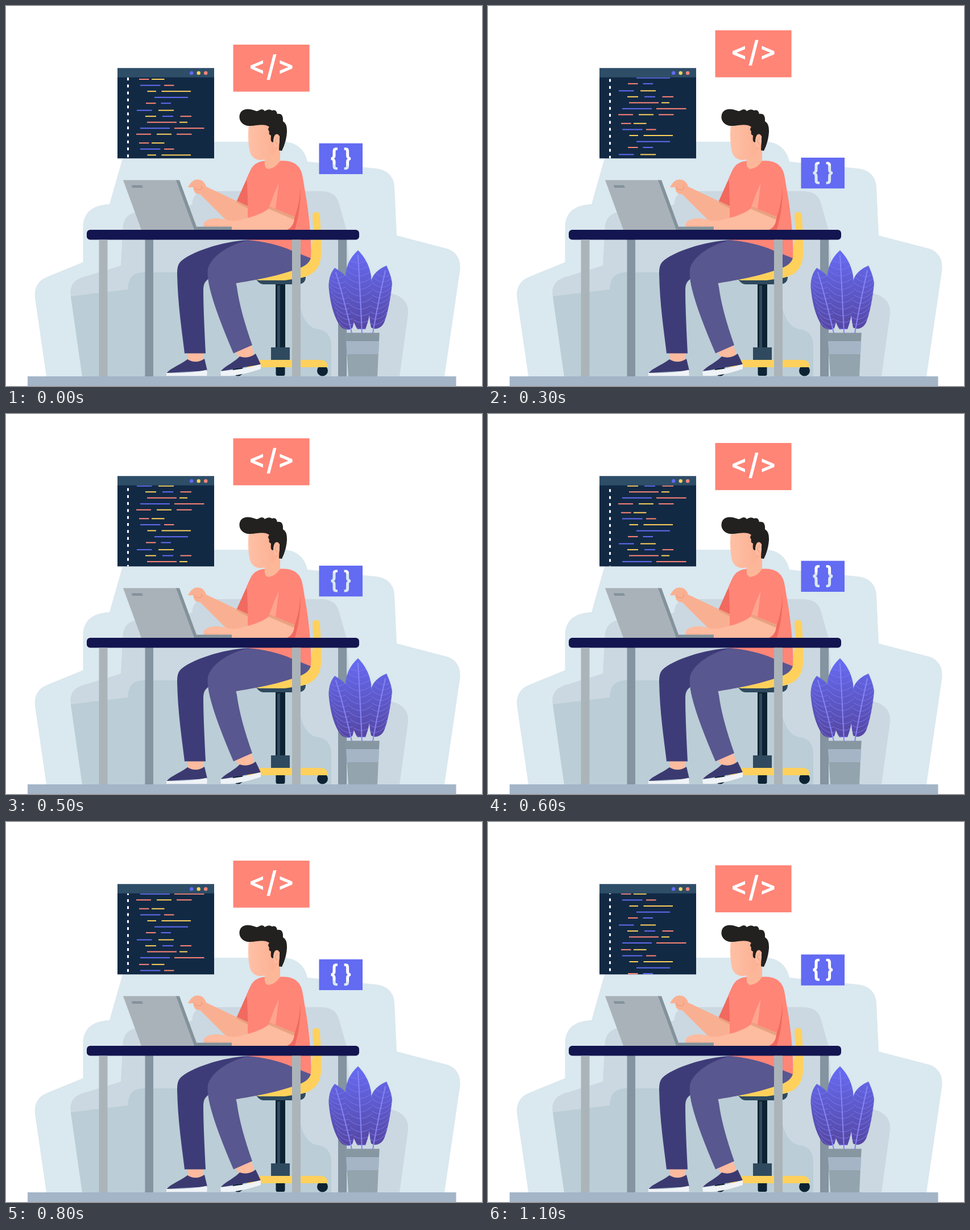
Animation of 837x669 px, one loop 1.2 s. Source, as an HTML page with a canvas:

```html
<!DOCTYPE html>
<html lang="en">
<head>
<meta charset="utf-8">
<title>Coding at a desk</title>
<style>
html, body { margin: 0; width: 100%; height: 100%; overflow: hidden; background: #fff; }
canvas { display: block; }
</style>
</head>
<body>
<canvas id="stage" width="837" height="669"></canvas>
<script>
const W = 837, H = 669, STEP = 100, STEPS = 12;
const RED = '#ff8577', YELLOW = '#ffd15c', BLUE = '#626bf2';
const SLATE = '#2f4a5f', DARK = '#0d2232', SKIN = '#fdbb9f', FAR_SKIN = '#f9b092';
const FOLD = '#f2695f', STEEL = '#a9b2b8', SHADE = '#8494a0';

const stage = document.getElementById('stage').getContext('2d');
const backdrop = layer(), front = layer();

function layer() {
  const c = document.createElement('canvas');
  c.width = W;
  c.height = H;
  return c.getContext('2d');
}

function fill(c, d, color) {
  c.fillStyle = color;
  c.fill(new Path2D(d));
}

function line(c, d, color, width) {
  c.strokeStyle = color;
  c.lineWidth = width;
  c.lineCap = 'round';
  c.stroke(new Path2D(d));
}

// Rectangle given by its left, top, right and bottom edges.
function box(c, x1, y1, x2, y2, color) {
  c.fillStyle = color;
  c.fillRect(x1, y1, x2 - x1, y2 - y1);
}

function dot(c, x, y, r, color) {
  c.fillStyle = color;
  c.beginPath();
  c.arc(x, y, r, 0, Math.PI * 2);
  c.fill();
}

function fade(c, x1, y1, x2, y2, from, to) {
  const g = c.createLinearGradient(x1, y1, x2, y2);
  g.addColorStop(0, from);
  g.addColorStop(1, to);
  return g;
}

function drawSofa(c) {
  fill(c, `M71 652 L51 514 Q48 487 72 477 L135.500 451 V389 C136 362 154 350 182 349 L205 268 L211 250
    Q215 239 230 239 H488 C510 239 526 253 530 274 L650 286 C671 288 682 301 683 318 L687 404
    L775 427 C792 432 800 446 798.500 464 L771 652 Z`, '#dae8ef');
  fill(c, `M134 652 L114 512 C111 491 120 481 140 476 L202 457 L205.500 390 C207 371 219 363 236 362
    L327 350 Q329 326 350 326 H553 C570 326 581 332 585 346 L599 395 L606 488 L672 505
    C695 508 709 522 707 542 L692 652 Z`, '#cbd8e1');
  fill(c, `M134 652 L114 511 L214 499 C215 480 222 470 240 469 H480 Q500 469 505 490 L518 533
    Q527 566 548 569 C565 571 572 583 572 598 V652 Z`, '#bbcdd6');
}

function drawChair(c) {
  dot(c, 408, 642, 9.5, DARK);
  dot(c, 556.5, 642, 9.5, DARK);
  fill(c, 'M474.500 634 H490.500 V648 Q490.500 651 487.500 651 H477.500 Q474.500 651 474.500 648 Z', DARK);
  fill(c, 'M425 623 H555 Q565 624 566 636 H425 Z', YELLOW);
  box(c, 474, 488, 491, 602, DARK);
  box(c, 477, 492, 482, 602, SLATE);
  box(c, 466, 601, 499, 623, SLATE);
  fill(c, 'M438 477 H527 C527 485 522 490 513 490 H452 Q443 489 438 477 Z', SLATE);
  fill(c, `M430 478 L534 446 L541 400 L539 369 a6.500 6.500 0 0 1 13 0 L554 410 V438
    C553 462 540 475 517 479 L490 483 H447 Q440 483 437 478 Z`, YELLOW);
}

function drawLegs(c) {
  fill(c, 'M319 610 H347 L345 626 Q330 632 321 624 Z', SKIN);
  fill(c, 'M403 608 L431 596 L437 615 Q424 625 412 621 Z', SKIN);
  fill(c, 'M283 646 C287 639 304 633 319 622 Q334 631 349 621 L354 642 Z', '#3b3a70');
  fill(c, 'M282 646 Q320 648 353.500 640.500 V651 H282 Z', '#f0f3f7');
  fill(c, 'M378 643 C382 636 400 628 411 617 Q426 622 439 612 L448 631 Z', '#3b3a70');
  fill(c, 'M377 643 Q415 641 448 630.500 V639 C430 645 411 650 394 651 H378 Z', '#f0f3f7');
  fill(c, `M427 412 C380 414 325 433 307 450 C302 455 301 462 301 472 C302 525 309 570 314 611.500
    H351 C349 570 347 530 347 500 C347 490 350 484 357 480 L430 455 Z`, '#3e3c78');
  fill(c, `M427 412 C390 420 360 442 355 463 C352 487 366 531 400 611.500 L433 597
    C420 560 410 525 406 495 L404.500 488 C430 484 470 477 500 467 C520 461 532 456 536 444 L510 412 Z`, '#58578f');
}

function drawBody(c) {
  // far arm
  fill(c, `M320 319 C326 309 330 305 338 305.500 C346 306 350 312 352 318 L407 344 L426 353 V380
    H390 L341 331 C334 332 330 328 329 319 L322 319.500 Z`, FAR_SKIN);
  line(c, 'M331 320 Q335 325 343 323 Q347 319 343 317', '#ef8f74', 1);
  fill(c, 'M406 342 L426 352 V357 L405.500 346 Z', '#e99e7e');
  fill(c, 'M430 289 L406 343 L426 352.500 L430 300 Z', FOLD);

  // torso
  fill(c, `M456 272.500 C440 274 433 281 429 291 L423 304 C426 330 425 370 425 412 C450 414 480 420 503 431
    L536 444 C538 420 533 370 529 345 L522 303 C520 285 510 273 489 272.500 Z`, RED);
  fill(c, 'M479.500 312 Q470 332 463 353 L474 357 Q477 334 479.500 312 Z', '#ffa48f');
  fill(c, 'M518 318 Q516 350 507 374 L496 394 H508 Q519 356 518 318 Z', FOLD);

  // near arm
  fill(c, `M463 356 L507 374 C506 387 499 394 488 395 H360 Q348 393 347 385 C349 377 360 373 374 374
    C385 375 395 380 405 378 C426 373 446 369 463 356 Z`, SKIN);
  fill(c, 'M463 353 L508 371 L506 376 L461.500 357 Z', '#e9a382');
  line(c, 'M349 387 H372', '#f4a589', .8);
}

function drawHead(c) {
  fill(c, 'M455 262 V279 Q456 287 462 287 Q474 285 482 273 V240 H455 Z', '#fcb798');
  fill(c, `M427 209 C425 225 426 245 429 257 C432 267 440 272 450 271 C463 270 472 261 475 251
    H480 V205 H427 Z`, fade(c, 426, 0, 474, 0, '#ffc0a6', '#fbb193'));
  fill(c, `M411 191 C413 184 420 180 430 182 C440 184 440 187 446 183 Q452 180 455 185 Q462 180 468 184
    Q475 181 477 190 Q488 188 487 203 C494 207 494 215 494 222 C493 236 489 247 485 255 L480 254
    L481 230 Q479 224 474 226 Q470 229 470 240 L467 239 C465 236 466 231 466 228 Q461 226 463 221
    Q459 217 463 213 C455 206 440 211 430 211 C418 212 408 203 411 191 Z`, '#22211f');
  c.fillStyle = SKIN;
  c.beginPath();
  c.ellipse(475.5, 238, 5.5, 11, .08, 0, Math.PI * 2);
  c.fill();
  line(c, 'M479 231 Q473 234 474 240 Q477 240 476 244', '#f39479', 1);
}

function drawDesk(c) {
  fill(c, 'M206 306.500 H301 L334 394 H238 Z', STEEL);
  fill(c, 'M299 306.500 H305 L335 388.500 H397 V394 H331 Z', '#83929b');
  fill(c, 'M220.500 315.500 H239 L241 320 H222.500 Z', '#83929b');
  c.fillStyle = '#12154f';
  c.beginPath();
  c.roundRect(142, 394, 479, 17.5, 6);
  c.fill();
  box(c, 163.5, 411.5, 178.5, 652, '#abb4b9');
  box(c, 503, 411.5, 518, 652, '#abb4b9');
}

function drawLeaf(c, outline, [x1, y1], [x2, y2], spread) {
  const shape = new Path2D(outline);
  c.fillStyle = fade(c, 0, 435, 0, 570, '#666bf2', '#5546a0');
  c.fill(shape);
  c.save();
  c.clip(shape);
  for (let u = .1; u < .95; u += .085) {
    const x = x1 + (x2 - x1) * u, y = y1 + (y2 - y1) * u;
    for (const side of [-spread, spread]) {
      line(c, `M${x} ${y} Q${x + side * .65} ${y - 2} ${x + side} ${y - 14}`, '#7f78ea', .9);
    }
  }
  c.restore();
  line(c, `M${x1} ${y1} Q${(x1 + x2) / 2} ${(y1 + y2) / 2 - 8} ${x2} ${y2}`, '#8583f5', 2);
}

function drawPlant(c) {
  drawLeaf(c, `M578 461 C570 470 566 485 568 500 C571 530 580 555 590 566 Q602 573 609 567
    C617 545 616 510 608 490 C600 476 590 468 578 461 Z`, [580, 469], [608, 576], 21);
  drawLeaf(c, `M669 457 C655 463 643 473 642 487 C638 515 637 545 642 566 C650 571 660 567 665 557
    C672 540 677 510 679 488 C677 475 673 465 669 457 Z`, [667, 466], [645, 576], 21);
  drawLeaf(c, `M619 430 C604 443 596 462 597 480 C598 510 606 550 618 569 H632
    C642 545 645 505 642 475 C639 455 629 440 619 430 Z`, [619, 439], [626, 576], 24);
  fill(c, 'M597 575.500 H656.500 L653 652 H602 Z', '#93a4ae');
  fill(c, 'M597 575.500 H656.500 L656 590 H598 Z', '#8797a2');
  fill(c, 'M598 590 H656 L655 613 H599.500 Z', '#a5b5c6');
}

function drawScene() {
  drawSofa(backdrop);
  box(backdrop, 196, 109.5, 366, 268.3, '#122944');
  const c = front;
  box(c, 244.5, 411, 259, 652, SHADE);
  box(c, 584, 411, 599, 652, SHADE);
  drawChair(c);
  drawLegs(c);
  drawBody(c);
  drawHead(c);
  drawDesk(c);
  drawPlant(c);
  box(c, 38, 652, 791.5, 669, '#a4b5c8');
}

// Code window: each row is its offset followed by bars of [from, to, colour].
const rows = [
  [0, [234, 251.5, RED], [256, 278.5, YELLOW]],
  [10.7, [236, 271.5, BLUE], [278, 295.5, RED]],
  [21.2, [248.5, 264, YELLOW], [273.5, 325, YELLOW]],
  [31.9, [261, 320, BLUE]],
  [42.2, [246, 263.5, RED], [272.5, 290, BLUE]],
  [54.7, [230, 256.5, BLUE], [268, 295, YELLOW]],
  [65.2, [245, 264, YELLOW], [275, 294, BLUE], [306.5, 326, RED]],
  [75.7, [248, 300, RED], [305, 319, YELLOW]],
  [86.2, [236, 288, BLUE], [296, 348.5, RED]],
  [96.7, [229, 255, RED], [265, 291, YELLOW], [300, 326.5, RED]]
];
const scroll = [0, 12.5, 23.4, 34.4, 45, 57, 67.5, 78.1, 88.5, 88.5, 98.9, 114.5];

function drawRows(c, top, list) {
  for (const [y, ...bars] of list) {
    for (const [from, to, color] of bars) box(c, from, top + y - 1, to, top + y + 1, color);
  }
}

function drawCode(c, shift) {
  c.save();
  c.beginPath();
  c.rect(196, 125.5, 170, 142.8);
  c.clip();
  for (let y = 126 - shift; y < 269; y += 12.3) box(c, 213, y, 216, y + 5, '#fff');
  const top = 129 - shift;
  drawRows(c, top, rows);
  drawRows(c, top + 112.2, rows.slice(0, 9));
  drawRows(c, top + 210.3, rows);
  c.restore();
  box(c, 196, 109.5, 366, 125.7, '#2e4e68');
  [BLUE, YELLOW, RED].forEach((color, i) => dot(c, 326.2 + i * 12.5, 118, 3.2, color));
}

// Floating panels with cut-out glyphs.
const tagPanel = new Path2D(`M399.500 0 H533.600 V82.800 H399.500 Z
  M452 27.500 L430 36.800 V42.200 L452 51.500 V45.600 L437 39.500 L452 33.400 Z
  M481.500 27.500 L503.500 36.800 V42.200 L481.500 51.500 V45.600 L496.500 39.500 L481.500 33.400 Z
  M470 17 H475.500 L464 62 H458.500 Z`);

const brace = new Path2D(`M583 7.500 H581 C576 7.500 574.500 10 574.500 14.500 V20.500
  C574.500 23.500 573.800 24.600 571.500 24.800 V29.200 C573.800 29.400 574.500 30.500 574.500 33.500 V39.500
  C574.500 44 576 46.500 581 46.500 H583 V42.300 H582 C580 42.300 579.500 41.500 579.500 39 V32.500
  C579.500 29.500 578.600 27.800 576.500 27 C578.600 26.200 579.500 24.500 579.500 21.500 V15
  C579.500 12.500 580 11.700 582 11.700 H583 Z`);
const bracePanel = new Path2D('M550.500 0 H627 V54.400 H550.500 Z');
bracePanel.addPath(brace);
bracePanel.addPath(brace, new DOMMatrix([-1, 0, 0, 1, 1177.6, 0]));

function drawPanel(c, path, y, color) {
  c.save();
  c.translate(0, y);
  c.fillStyle = color;
  c.fill(path, 'evenodd');
  c.restore();
}

function render() {
  const k = Math.floor(performance.now() / STEP) % STEPS;
  const drift = 8.4 * Math.min(Math.abs(k - 4), STEPS - Math.abs(k - 4));
  stage.fillStyle = '#fff';
  stage.fillRect(0, 0, W, H);
  stage.drawImage(backdrop.canvas, 0, 0);
  drawCode(stage, scroll[k]);
  drawPanel(stage, tagPanel, 34.3 + drift, RED);
  drawPanel(stage, bracePanel, 275.3 - drift, BLUE);
  stage.drawImage(front.canvas, 0, 0);
  requestAnimationFrame(render);
}

drawScene();
render();
</script>
</body>
</html>
```
